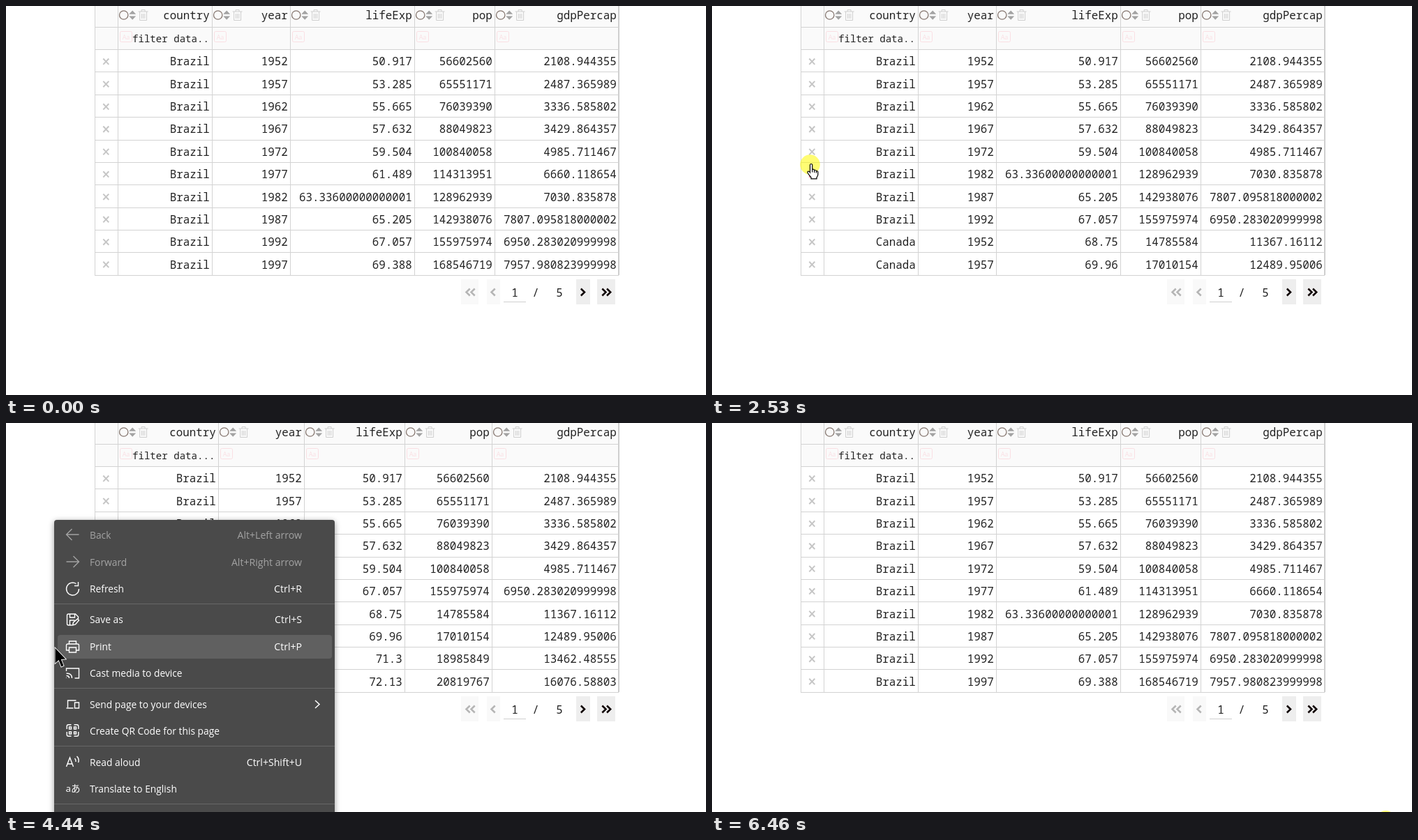
Write an HTML page with a canvas that moves like this. It is 1003 by 558 pixels and loops after 6.59 s.

```html
<!DOCTYPE html>
<html lang="en">
<head>
<meta charset="utf-8">
<title>Editable table</title>
<style>
html, body { margin: 0; width: 100%; height: 100%; overflow: hidden; background: #fff; }
canvas { display: block; }
</style>
</head>
<body>
<canvas id="stage" width="1003" height="558"></canvas>
<script>
const W = 1003, H = 558, LOOP = 6590;
const screen2d = document.getElementById('stage').getContext('2d');
const layer = document.createElement('canvas');
layer.width = W;
layer.height = H;
const layer2d = layer.getContext('2d');
let g = screen2d;

const MONO = '"Noto Sans Mono", "DejaVu Sans Mono", monospace';
const SANS = '"Open Sans", "Noto Sans", sans-serif';
const TOP = 62.5, ROW = 32.36;

const titles = ['country', 'year', 'lifeExp', 'pop', 'gdpPercap'];
const data = `Brazil 1952 50.917 56602560 2108.944355
Brazil 1957 53.285 65551171 2487.365989
Brazil 1962 55.665 76039390 3336.585802
Brazil 1967 57.632 88049823 3429.864357
Brazil 1972 59.504 100840058 4985.711467
Brazil 1977 61.489 114313951 6660.118654
Brazil 1982 63.33600000000001 128962939 7030.835878
Brazil 1987 65.205 142938076 7807.095818000002
Brazil 1992 67.057 155975974 6950.283020999998
Brazil 1997 69.388 168546719 7957.980823999998
Brazil 2002 71.006 179914212 8131.212843000001
Brazil 2007 72.39 190010647 9065.800825
Canada 1952 68.75 14785584 11367.16112
Canada 1957 69.96 17010154 12489.95006
Canada 1962 71.3 18985849 13462.48555
Canada 1967 72.13 20819767 16076.58803`.split('\n').map(line => line.split(' '));

const colsLong = [127, 160, 295, 407, 585, 700, 878];
const colsShort = [127, 160, 304, 427, 571, 696, 878];

// [time, row index]
const removals = [[950, 9], [1290, 9], [1550, 9], [2330, 5], [2660, 5], [3080, 5]];
const presses = [[890, 950], [1220, 1290], [1480, 1550], [2200, 2330], [2530, 2660],
  [2930, 3080], [4110, 4240], [5440, 5590]];

// Stepped pointer moves, each easing out with its own power per axis
const last = [147.5, 371.5], sixth = [140.5, 227.5], left = [69.5, 321.5], refresh = [198.5, 234];
const moves = [
  { t0: 70, t1: 690, n: 10, a: [999, 594], b: last, k: [4.5, 4.5] },
  { t0: 1740, t1: 2020, n: 5, a: last, b: sixth, k: [2.3, 2.3] },
  { t0: 3520, t1: 3780, n: 5, a: sixth, b: left, k: [2, 2] },
  { t0: 4710, t1: 5170, n: 8, a: left, b: refresh, k: [2.5, 1.16] }
];

function pointerAt(t) {
  if (t < 70) return null;
  if (t >= 5720) {
    if (t < 5790) return [891, 416];
    return t >= 6120 && t < 6190 ? [989, 545] : null;
  }
  const m = moves.filter(v => t >= v.t0).pop();
  const step = Math.floor((t - m.t0) / (m.t1 - m.t0) * (m.n - 1) + 0.03);
  const p = Math.min(1, (step + 1) / m.n);
  return m.b.map((end, i) => end + (m.a[i] - end) * (1 - p) ** m.k[i]);
}

function rect(x, y, w, h, color) {
  g.fillStyle = color;
  g.fillRect(x, y, w, h);
}

function text(s, x, y, font, color, align = 'left') {
  g.font = font;
  g.fillStyle = color;
  g.textAlign = align;
  g.fillText(s, x, y);
}

function roundBox(x, y, w, h, r) {
  g.beginPath();
  g.roundRect(x, y, w, h, r);
}

function stroke(d, x, y, color, width) {
  g.save();
  g.translate(x, y);
  g.strokeStyle = color;
  g.lineWidth = width;
  g.stroke(new Path2D(d));
  g.restore();
}

function fill(d, x, y, color) {
  g.save();
  g.translate(x, y);
  g.fillStyle = color;
  g.fill(new Path2D(d));
  g.restore();
}

const mono = (s, x, y, align = 'right', size = 15.87, color = '#222') =>
  text(s, x, y, size + 'px ' + MONO, color, align);

const rowMiddle = r => TOP + ROW * (r + 0.5);

function headerIcons(x) {
  stroke('M6.2 0A6.2 6.2 0 1 1 -6.2 0A6.2 6.2 0 1 1 6.2 0', x + 8.7, 13, '#85766f', 1.3);
  fill('M-5 -1.2L0 -6.5L5 -1.2ZM-5 1.4L0 6.7L5 1.4Z', x + 21.2, 13, '#a3a3a3');
  stroke('M-7 -5H7M-2.5 -5V-7.5H2.5V-5M-5 -5V7.5H5V-5M-2.2 -2V5M0 -2V5M2.2 -2V5',
    x + 36.6, 13, '#cfcfcf', 1);
}

function caseIcon(x) {
  g.strokeStyle = '#fadfe3';
  g.lineWidth = 1;
  roundBox(x + 3.5, 36.5, 17, 15, 2);
  g.stroke();
  text('Aa', x + 12, 47.5, '9px ' + SANS, '#fadfe3', 'center');
}

function drawTable(rows, cols, hot) {
  rect(127, 0, 751, TOP, '#fafafa');
  titles.forEach((title, i) => {
    const x = cols[i + 1], right = cols[i + 2] - 3.2;
    headerIcons(x);
    caseIcon(x);
    mono(title, right, 19);
    rows.forEach((row, r) => mono(row[i], right, Math.round(rowMiddle(r) + 6.7)));
  });
  mono(cols === colsLong ? 'filter data..' : 'filter data...', 181, 52, 'left', 14.1);
  rows.forEach((row, r) =>
    stroke('M-4 -4.2L4 4.2M4 -4.2L-4 4.2', 143.3, rowMiddle(r) + 1,
      r === hot ? '#f47a90' : '#c6c6c6', 2));

  const line = '#d3d3d3';
  cols.forEach(x => rect(x, 0, 1, 386, line));
  rect(877, 0, 2, 386, '#cfcfcf');
  rect(127, 30, 751, 1, line);
  for (let r = 0; r <= 10; r++) rect(127, Math.round(TOP - 0.4 + ROW * r), 751, 1, line);
}

function drawPager() {
  const chevron = (x, dir, color) =>
    stroke(`M${-2.7 * dir} -5L${2.5 * dir} 0L${-2.7 * dir} 5`, x, 410.5, color, 2.5);
  rect(652, 392, 25, 36, '#f9f9f9');
  rect(689, 392, 19, 36, '#f9f9f9');
  rect(817, 392, 20, 36, '#eee');
  rect(847, 392, 26, 36, '#eee');
  [662, 669, 698].forEach(x => chevron(x, -1, '#b5b5b5'));
  [826.5, 857, 863.7].forEach(x => chevron(x, 1, '#100505'));
  mono('1', 729, 417, 'center');
  mono('/', 759, 417, 'center');
  mono('5', 793, 417, 'center');
  rect(713, 424, 32, 1, '#cfcfcf');
}

const items = [
  ['Back', 161, 'Alt+Left arrow', 'M9 -1H-9M-1 -9L-9 -1L-1 7'],
  ['Forward', 200, 'Alt+Right arrow', 'M-9 -1H9M1 -9L9 -1L1 7'],
  ['Refresh', 238, 'Ctrl+R', 'M9 0A9 9 0 1 1 5 -7.5M8 -10V-4.5H2.5'],
  ['Save as', 282, 'Ctrl+S',
    'M-1 8H-6Q-8 8 -8 6V-6Q-8 -8 -6 -8H4L8 -4V-1M-4 -8V-3H3V-8M-4 8V1H3M0 8L1 4L7 -1L9 1L4 7Z'],
  ['Print', 321, 'Ctrl+P', 'M-5 -4V-8H5V-4M-5 5H-9V-2Q-9 -4 -7 -4H7Q9 -4 9 -2V5H5M-5 1H5V8H-5Z'],
  ['Cast media to device', 359, '',
    'M-9 -3V-7H9V7H3M-9 0Q-1 0 -1 7M-9 3.5Q-5 3.5 -5 7M-9 6.5V7'],
  ['Send page to your devices', 404, '', 'M-7 4V-6H5M-9 5H1M3 -3H9V5H3Z'],
  ['Create QR Code for this page', 442, '',
    'M-5 -6H-2V-3H-5ZM2 -6H5V-3H2ZM-5 1H-2V4H-5ZM2 1H5V4H2Z' +
    'M-8.3 -3V-7Q-8.3 -9.3 -6 -9.3H-2M2 -9.3H6Q8.3 -9.3 8.3 -7V-3' +
    'M-8.3 1V5Q-8.3 7.3 -6 7.3H-2M2 7.3H6Q8.3 7.3 8.3 5V1'],
  ['Read aloud', 487, 'Ctrl+Shift+U',
    'M-9 6L-4 -7L1 6M-7.4 2H-0.6M3 -6Q5 -4 4.5 -1M6 -9Q10 -5 8 0'],
  ['Translate to English', 525, '', '']
];

function drawMenu(hover) {
  g = layer2d;
  g.clearRect(0, 0, W, H);
  g.save();
  g.shadowColor = 'rgba(0,0,0,.4)';
  g.shadowBlur = 8;
  g.shadowOffsetY = 2;
  g.fillStyle = '#4a4a4a';
  roundBox(69, 139, 402, 450, 4);
  g.fill();
  g.restore();
  [259, 380, 463, 546].forEach(y => rect(69, y, 402, 1, '#676767'));
  items.forEach(([label, y, keys, icon], i) => {
    const color = i < 2 ? '#a3a3a3' : '#fff';
    if (i === hover) {
      g.fillStyle = '#606060';
      roundBox(74, y - 17, 393, 34, 4);
      g.fill();
    }
    text(label, 120, y + 5, '13.8px ' + SANS, color);
    text(keys, 424, y + 5, '14.1px ' + SANS, color, 'right');
    stroke(icon, 95.5, y, color, 1.4);
  });
  text('a\u3042', 85.5, 529, '13.5px "Open Sans", "Noto Sans CJK JP", "Noto Sans CJK", sans-serif', '#fff');
  stroke('M-3 -5.5L3 0L-3 5.5', 446, 403.5, '#fff', 1.5);
  g = screen2d;
}

function spot(x, y) {
  g.fillStyle = 'rgba(255,250,0,.55)';
  g.beginPath();
  g.arc(x, y, 14.3, 0, 7);
  g.fill();
}

const handPath = 'M0 .5Q0 -1 1.5 -1Q3.2 -1 3.2 .5V7Q5.2 6 6.2 8Q8 7.2 9 9Q11.3 8.8 11.3 11' +
  'V14.5Q11 17 9.5 18.5V20.3H1.5V18.5Q-1.5 15 -3.3 12Q-4 10 -2.6 9.6Q-1 9.5 0 11.2Z';
const arrowPath = 'M1 1.5V23L6 18.5L9.8 28L13 26.5L9.3 17.5L15.8 17Z';

function drawPointer([x, y], hand) {
  if (hand) {
    fill(handPath, x, y, '#fff');
    stroke(handPath + 'M3.2 7V11M6.2 8V11.5M9 9V12', x, y, '#000', 1.2);
  } else {
    stroke(arrowPath, x, y, '#fff', 1.8);
    fill(arrowPath, x, y, '#000');
  }
}

function draw(t) {
  rect(0, 0, W, H, '#fff');
  const at = pointerAt(t);
  const reloaded = t >= 5650;
  const menuAlpha = t < 4300 || t >= 5590 ? 0 : t < 4370 ? 0.31 : t < 4440 ? 0.75 : 1;
  const hand = !!at && !menuAlpha && at[0] > 127 && at[0] < 160 && at[1] > TOP && at[1] < 386;

  if (!reloaded || t >= 5720) {
    const rows = data.slice();
    if (!reloaded) removals.forEach(([when, r]) => { if (t >= when) rows.splice(r, 1); });
    const shown = rows.slice(0, 10);
    const long = shown.some(row => row[2].length > 10);
    drawTable(shown, long ? colsLong : colsShort, hand ? Math.floor((at[1] + 4 - TOP) / ROW) : -1);
    drawPager();
  }
  if (menuAlpha) {
    drawMenu(t < 4840 ? 4 : t < 5110 ? 3 : 2);
    g.globalAlpha = menuAlpha;
    g.drawImage(layer, 0, 0);
    g.globalAlpha = 1;
  }
  if (at && presses.some(([on, off]) => t >= on && t < off)) spot(...at);
  if (t >= 6460) spot(965.5, 570.3);
  if (at) drawPointer(at, hand);
}

const start = performance.now();
function tick() {
  draw((performance.now() - start) % LOOP);
  requestAnimationFrame(tick);
}
tick();
</script>
</body>
</html>
```
